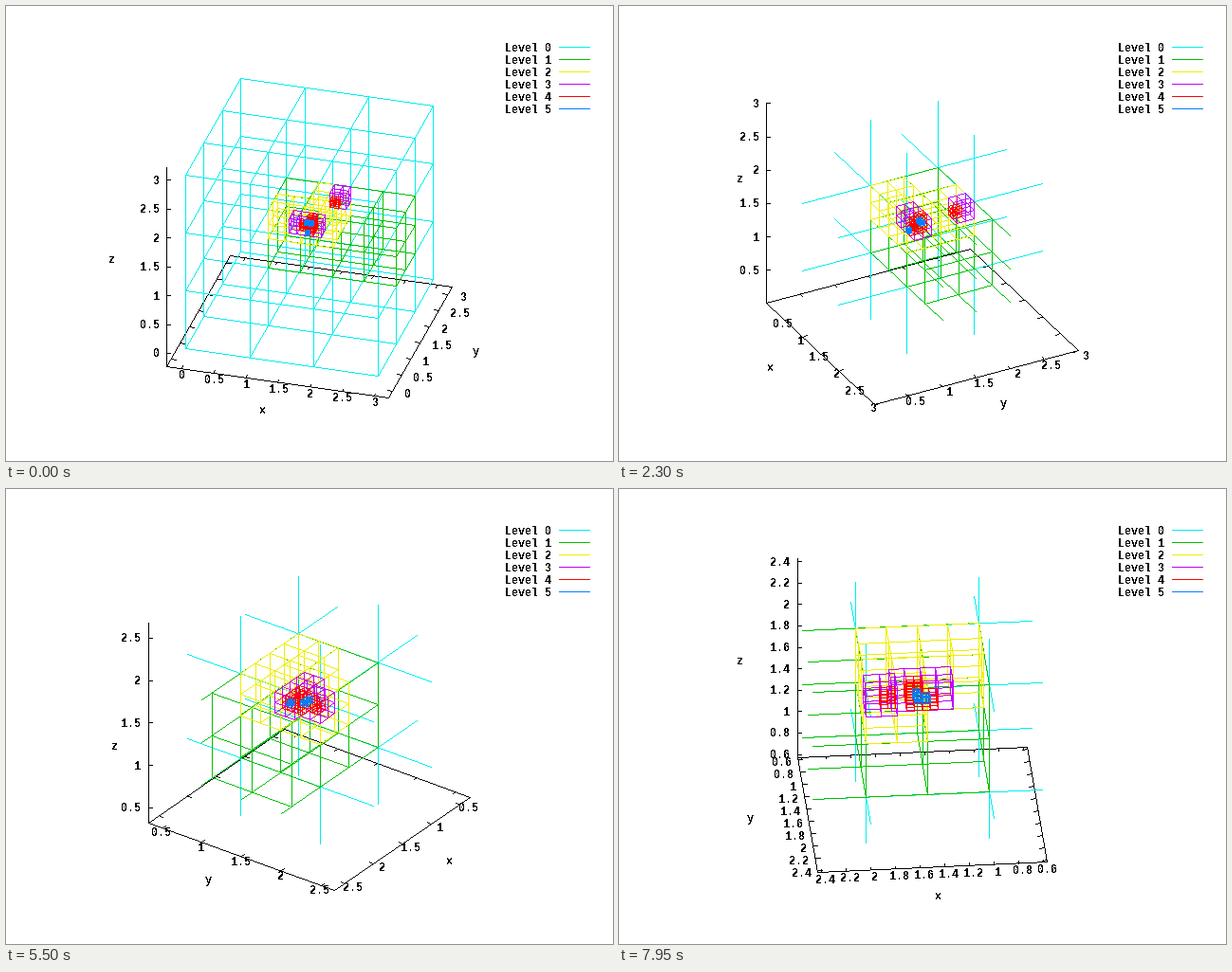
A matplotlib script for the animation above (8000 ms loop, 640 by 480 pixels).

```python
import itertools
import math

import matplotlib.pyplot as plt
import numpy as np
from matplotlib.animation import FuncAnimation
from matplotlib.colors import to_rgb

W, H, DPI = 640, 480, 100
PX = 72 / DPI
FRAMES, STEP_MS = 160, 50

SIDE = 242.7                      # edge of the plot cube in pixels
RISE = SIDE * math.sin(math.radians(60))
BASE = np.array([320.0, 338.6])   # centre of the base square

BLACK = (0, 0, 0)
COLORS = [to_rgb(c) for c in ("#00eeee", "#00c000", "#eeee00",
                              "#c000ff", "#ff0000", "#0080ff")]

# per level: corner and size of each block, in cells of 1 / 2**level
BLOCKS = [
    [((0, 0, 0), (3, 3, 3))],
    [((2, 2, 2), (4, 2, 2))],
    [((4, 4, 6), (4, 2, 2)), ((6, 6, 6), (2, 2, 2))],
    [((10, 10, 12), (4, 2, 2)), ((14, 14, 14), (2, 2, 2))],
    [((24, 20, 24), (2, 2, 2)), ((22, 22, 24), (4, 2, 2)),
     ((24, 22, 26), (2, 2, 2)), ((28, 28, 28), (2, 2, 2))],
    [((48, 40, 48), (2, 2, 2)), ((46, 46, 50), (4, 2, 2))],
]

plt.rcParams.update({
    "font.family": "Liberation Mono",
    "font.weight": "bold",
    "font.size": 11.67 * PX,
    "text.antialiased": False,
})

fig = plt.figure(figsize=(W / DPI, H / DPI), dpi=DPI, facecolor="white")
ax = fig.add_axes([0, 0, 1, 1])
ax.axis("off")

blank = np.ones((H, W, 3))
for i, color in enumerate(COLORS):
    row = 43 + 13 * i
    blank[row, 583:616] = color
    ax.text(526, row + 5, f"Level {i}")
image = ax.imshow(blank, extent=(0, W, H, 0), aspect="auto",
                  interpolation="nearest")


def stroke(canvas, a, b, color):
    """One-pixel line without smoothing."""
    a, b = np.floor(a), np.floor(b)
    steps = int(np.abs(b - a).max())
    t = np.linspace(0, 1, steps + 1)[:, None]
    x, y = np.floor(a + t * (b - a) + 0.5).astype(int).T
    canvas[y, x] = color


def lattice(corner, size, cell):
    """Grid lines of a block as pairs of 3D end points."""
    lines = []
    for run in range(3):
        spans = [[0] if d == run else range(size[d] + 1) for d in range(3)]
        for start in itertools.product(*spans):
            end = list(start)
            end[run] = size[run]
            lines.append([np.add(corner, start), np.add(corner, end)])
    return np.array(lines) * cell


LEVELS = [np.concatenate([lattice(c, s, 0.5 ** i) for c, s in blocks])
          for i, blocks in enumerate(BLOCKS)]


class View:
    """Turns one degree per frame while the visible range shrinks."""

    def __init__(self, n):
        self.lo = -0.225 + 0.005 * n
        self.hi = 3 - self.lo
        a = math.radians(16 + n)
        c, s = math.cos(a), math.sin(a)
        self.front = c > 0
        self.vx = SIDE * np.array([c, s / 2])
        self.vy = SIDE * np.array([s, -c / 2])
        self.axes = np.array([self.vx, self.vy, [0, -RISE]])

    def project(self, p):
        u = (np.asarray(p, float) - self.lo) / (self.hi - self.lo)
        return BASE + (u - [0.5, 0.5, 0]) @ self.axes

    def clip(self, lines):
        lo, hi = self.lo - 1e-9, self.hi + 1e-9
        keep = ((lines.max(1) >= lo) & (lines.min(1) <= hi)).all(1)
        return np.clip(lines[keep], lo, hi)

    def ticks(self):
        step = 0.5 if self.hi - self.lo > 2 - 1e-9 else 0.2
        first = math.ceil(self.lo / step - 1e-9)
        last = math.floor(self.hi / step + 0.01 + 1e-9)
        return [round(k * step, 1) for k in range(first, last + 1)]


labels = []


def put(pos, text, ha="center", drop=4):
    labels.append(ax.text(pos[0], pos[1] + drop, text, ha=ha))


def tick_label(pos, inward, text):
    u = inward / np.hypot(*inward)
    dy = 2 - 5.5 * u[1]
    if u[0] < -0.972:
        put(pos + [12.5, dy], text, "left")
    elif u[0] > 0.972:
        put(pos + [-6.5, dy], text, "right")
    else:
        put(pos + [3.5 - 5.5 * u[0], dy], text)


def draw_axes(canvas, v):
    lo, hi = v.lo, v.hi
    near, far = (lo, hi) if v.front else (hi, lo)
    into_x = v.vy if v.front else -v.vy    # from the x axis into the plot
    into_y = -v.vx

    def line(a, b):
        stroke(canvas, a, b, BLACK)

    def mark(p, direction):
        pos = v.project(p)
        line(pos, pos + direction / SIDE * 5)
        return pos

    corners = v.project([[lo, lo, lo], [hi, lo, lo], [hi, hi, lo], [lo, hi, lo]])
    for a, b in zip(corners, np.roll(corners, -1, axis=0)):
        line(a, b)
    foot = v.project([near, lo, lo])
    line(foot, foot - [0, RISE])

    for t in v.ticks():
        text = f"{t:g}"
        tick_label(mark([t, near, lo], into_x), into_x, text)
        mark([t, far, lo], -into_x)
        tick_label(mark([hi, t, lo], into_y), into_y, text)
        mark([lo, t, lo], -into_y)
        pos = foot - [0, RISE * (t - lo) / (hi - lo)]
        line(pos, pos + [4, 0])
        put(pos - [8, 0], text, "right")

    mid = (lo + hi) / 2
    put(v.project([mid, near, lo]) - into_x / 4, "x")
    put(v.project([hi, mid, lo]) - into_y / 4, "y")
    out = -v.vx if v.front else v.vx
    put(foot - [0, RISE / 2] + out / 4, "z")


def draw(n):
    for label in labels:
        label.remove()
    labels.clear()
    v = View(n)
    canvas = blank.copy()
    draw_axes(canvas, v)
    for lines, color in zip(LEVELS, COLORS):
        for a, b in v.project(v.clip(lines)):
            stroke(canvas, a, b, color)
    image.set_data(canvas)
    return [image, *labels]


anim = FuncAnimation(fig, draw, frames=FRAMES, interval=STEP_MS,
                     repeat=True, repeat_delay=0, blit=False)
plt.show()
```
